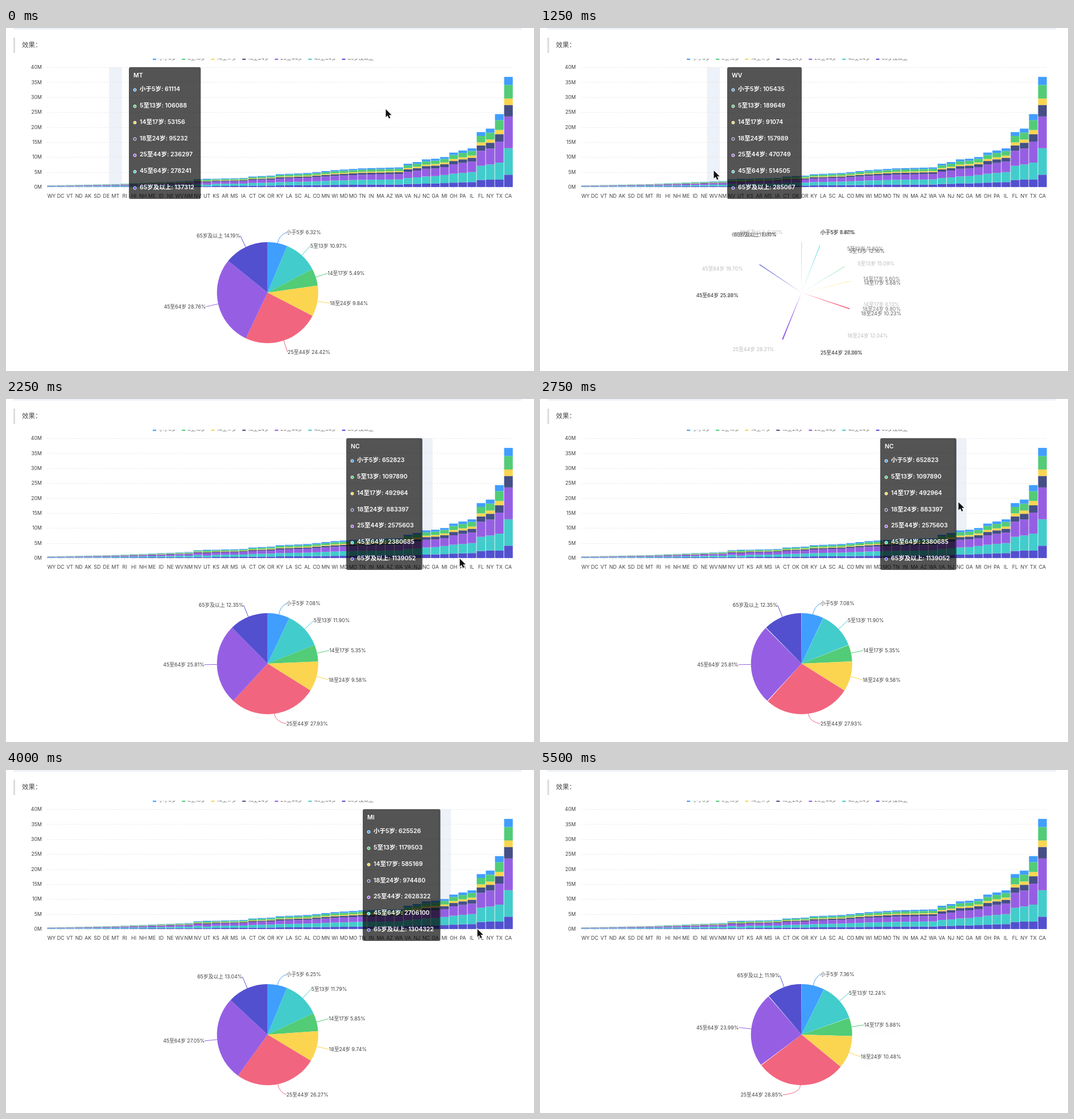
An HTML page with a canvas for the animation above (5750 ms loop, 928 by 604 pixels).

```html
<!DOCTYPE html>
<html lang="zh-CN">
<head>
<meta charset="utf-8">
<style>
  html, body { margin: 0; height: 100%; overflow: hidden; background: #fff; }
  canvas { display: block; }
</style>
</head>
<body>
<canvas id="stage" width="928" height="604"></canvas>
<script>
const ctx = document.getElementById('stage').getContext('2d');
const FAMILY = "Inter, 'Noto Sans CJK SC', 'Noto Sans CJK', sans-serif";
const INK = '#404040';
const [BLUE, GREEN, YELLOW, NAVY, PURPLE, TEAL, INDIGO, PINK] =
  ['#409eff', '#52cc76', '#fbd550', '#454f86', '#965fe3', '#42cccc', '#5250cf', '#f2657e'];
const barColors = [BLUE, GREEN, YELLOW, NAVY, PURPLE, TEAL, INDIGO];
const pieColors = [BLUE, TEAL, GREEN, YELLOW, PINK, PURPLE, INDIGO];
const groups = ['小于5岁', '5至13岁', '14至17岁', '18至24岁', '25至44岁', '45至64岁', '65岁及以上'];
const states = ('WY DC VT ND AK SD DE MT RI HI NH ME ID NE WV NM NV UT KS AR MS IA CT OK OR KY LA SC AL ' +
  'CO MN WI MD MO TN IN MA AZ WA VA NJ NC GA MI OH PA IL FL NY TX CA').split(' ');

const clamp = v => Math.max(0, Math.min(1, v));
const mix = (a, b, k) => a + (b - a) * k;
const sum = list => list.reduce((a, b) => a + b, 0);

// Linear path through points [position, ...values].
function along(points, at) {
  const next = points.findIndex(p => p[0] > at);
  if (next < 0) return points[points.length - 1].slice(1);
  const a = points[next - 1], b = points[next];
  return a.slice(1).map((v, i) => mix(v, b[i + 1], (at - a[0]) / (b[0] - a[0])));
}

// Counts that can be read on the stage; other states follow the curve with typical shares.
const rows = {
  MT: [61114, 106088, 53156, 95232, 236297, 278241, 137312],
  WV: [105435, 189649, 91074, 157989, 470749, 514505, 285067],
  NM: [148323, 241326, 112801, 203097, 517154, 501604, 260051],
  UT: [268916, 413034, 167685, 329585, 772024, 538978, 246202],
  NC: [652823, 1097890, 492964, 883397, 2575603, 2380685, 1139052],
  MI: [625526, 1179503, 585169, 974480, 2628322, 2706100, 1304322],
  TX: [2027307, 3277946, 1420518, 2454721, 7017731, 5666528, 2472223],
  CA: [2704659, 4499890, 2159981, 3853788, 10604510, 8819342, 4114496]
};
const shares = [.069, .118, .056, .098, .273, .258, .128];
const growth = [[0, .53], [7, .97], [15, 1.98], [16, 2.6], [21, 3], [22, 3.5], [24, 3.79], [25, 4.27],
  [28, 4.66], [31, 5.63], [34, 6.22], [38, 6.55], [39, 7.77], [43, 10], [44, 11.49], [46, 12.9],
  [47, 18.33], [48, 19.49]];
states.forEach((s, i) => {
  rows[s] ??= shares.map(k => Math.round(k * along(growth, i)[0] * 1e6));
});

const barX = s => 80 + states.indexOf(s) * 16.06;
const valueY = v => 280 - v * 5.275e-6;

// Pointer path [ms, x, y] and the states it touches [ms, state].
const pointer = [[0, 667, 143], [1250, 305, 251], [1500, 305, 251], [1750, 826, 281], [2250, 797, 281],
  [3000, 704, 132], [3250, 809, 282], [4000, 828, 280], [4250, 868, 150], [4750, 868, 150], [5000, 885, 232]];
const hovers = [[-1000, 'MT'], [510, 'SC'], [760, 'UT'], [843, 'NV'], [927, 'NM'], [1010, 'WV'],
  [1510, 'NC'], [2260, 'NC'], [3205, 'MI'], [4005, 'TX'], [5005, 'CA']];
const DELAY = 240, GROW = 400, FADE_IN = 100, FADE_OUT = 260;
const LEAVE = 5250, HIDE = 5500, LOOP = 5750;

function rect(x, y, w, h, color) {
  ctx.fillStyle = color;
  ctx.fillRect(x, y, w, h);
}
function text(str, x, y, { size = 8.8, color = INK, align = 'left', weight = 400 } = {}) {
  ctx.font = `${weight} ${size}px ${FAMILY}`;
  ctx.fillStyle = color;
  ctx.textAlign = align;
  ctx.textBaseline = 'middle';
  ctx.fillText(str, x, y);
  return ctx.measureText(str).width;
}

function drawPage() {
  rect(0, 0, 928, 604, '#fff');
  rect(13, 0, 893, 3, '#eef2f8');
  rect(13, 17, 3, 27, '#dcdcdc');
  text('效果：', 28, 30.5, { size: 11.5, color: '#444' });
}

function drawLegend() {
  ctx.save();
  ctx.beginPath();
  ctx.rect(250, 54, 420, 8);
  ctx.clip();
  let x = 258;
  groups.forEach((group, i) => {
    rect(x, 54, 6, 2, barColors[i]);
    x += 19.5 + text(group, x + 10, 53.5, { color: '#666' });
  });
  ctx.restore();
}

function drawBand(state, alpha) {
  rect(barX(state) - 11.3, 69, 22.6, 211, `rgba(204,214,236,${.35 * alpha})`);
}

function drawBars() {
  ctx.lineWidth = 1;
  ctx.strokeStyle = '#e6e6e6';
  ctx.setLineDash([2.5, 2.5]);
  for (let m = 0; m <= 40; m += 5) {
    const y = valueY(m * 1e6);
    ctx.beginPath();
    ctx.moveTo(72, Math.round(y) + .5);
    ctx.lineTo(891, Math.round(y) + .5);
    ctx.stroke();
    text(m + 'M', 63, y + .5, { align: 'right' });
  }
  ctx.setLineDash([]);
  for (const s of states) {
    const x = barX(s);
    let base = 0;
    for (let i = 6; i >= 0; i--) {
      const top = base + rows[s][i];
      rect(x - 7.5, valueY(top), 15.2, valueY(base) - valueY(top), barColors[i]);
      base = top;
    }
    rect(x - .5, 280.5, 1, 3, '#ddd');
    text(s, x, 296.5, { align: 'center' });
  }
}

const CX = 459.7, CY = 466, R = 89, LABEL_R = 111;
const polar = (angle, r) => [CX + r * Math.sin(angle), CY - r * Math.cos(angle)];

function eachSlice(state, draw) {
  const total = sum(rows[state]);
  let start = 0;
  rows[state].forEach((value, i) => {
    const share = value / total;
    draw(i, start, share * 2 * Math.PI, share);
    start += share * 2 * Math.PI;
  });
}

function drawPie(state, age) {
  const sweep = Math.max(.014, 1 - (1 - clamp(age / GROW)) ** 5);
  eachSlice(state, (i, start, size) => {
    const from = start - Math.PI / 2;
    ctx.beginPath();
    ctx.moveTo(CX, CY);
    ctx.arc(CX, CY, R, from, from + size * sweep);
    ctx.fillStyle = pieColors[i];
    ctx.fill();
  });
}

function drawLabels(state, alpha, withLines) {
  ctx.globalAlpha = alpha;
  eachSlice(state, (i, start, size, share) => {
    const mid = start + size / 2;
    const side = Math.sin(mid) < 0 ? -1 : 1;
    const dy = Math.max(-106, Math.min(106, -LABEL_R * Math.cos(mid)));
    const x = CX + side * Math.sqrt(LABEL_R ** 2 - dy ** 2), y = CY + dy;
    if (withLines) {
      ctx.beginPath();
      ctx.moveTo(...polar(mid, R));
      ctx.quadraticCurveTo(...polar(mid, R + 14), x, y);
      ctx.lineWidth = 1;
      ctx.strokeStyle = pieColors[i];
      ctx.stroke();
    }
    text(`${groups[i]} ${(share * 100).toFixed(2)}%`, x, y + .5, { align: side < 0 ? 'right' : 'left' });
  });
  ctx.globalAlpha = 1;
}

function tooltipBox(state) {
  const lines = groups.map((g, i) => `${g}: ${rows[state][i]}`);
  ctx.font = `600 10.5px ${FAMILY}`;
  const width = Math.max(...lines.map(s => ctx.measureText(s).width)) + 30.5;
  const x = barX(state);
  const left = x < 600 ? x + 24 : Math.min(x - 7, 850) - width;
  return { lines, width, left };
}

function drawTooltip(state, previous, progress) {
  const { lines, width, left: target } = tooltipBox(state);
  const left = Math.round(mix(tooltipBox(previous).left, target, progress));
  const white = { size: 10.5, color: '#fff', weight: 600 };
  ctx.beginPath();
  ctx.roundRect(left, 69, width, 232, 3);
  ctx.fillStyle = 'rgba(0,0,0,.67)';
  ctx.fill();
  text(state, left + 8, 84, white);
  lines.forEach((line, i) => {
    const y = 108 + i * 28.8;
    ctx.beginPath();
    ctx.arc(left + 10.5, y + 1, 2.5, 0, 7);
    ctx.fillStyle = barColors[i];
    ctx.fill();
    ctx.lineWidth = 1;
    ctx.strokeStyle = '#fff';
    ctx.stroke();
    text(line, left + 19, y, white);
  });
}

const arrow = new Path2D('M0 0V14L3.3 11L5.6 16.3L8 15.2L5.7 10.2H10.2Z');
function drawCursor([x, y]) {
  ctx.save();
  ctx.translate(x + .5, y);
  ctx.lineWidth = 1.6;
  ctx.strokeStyle = '#fff';
  ctx.stroke(arrow);
  ctx.fillStyle = '#111';
  ctx.fill(arrow);
  ctx.restore();
}

// Labels appear shortly after their pie starts and fade once the next pie replaces it.
function drawAllLabels(t, current) {
  hovers.forEach(([start, state], i) => {
    const next = hovers[i + 1]?.[0] ?? Infinity;
    const shown = clamp((t - start - DELAY) / FADE_IN);
    const gone = clamp((t - next - DELAY) / FADE_OUT);
    const alpha = shown * (1 - gone);
    if (alpha > 0) drawLabels(state, alpha, i === current);
  });
}

function frame() {
  // The picture is held for 750 ms, then renewed four times a second.
  const now = performance.now() % LOOP;
  const t = now < 750 ? 0 : Math.floor(now / 250) * 250;
  const lastBefore = time => hovers.findLastIndex(h => h[0] <= time);
  const active = lastBefore(t), charted = lastBefore(t - DELAY);
  const [start, state] = hovers[active];
  const previous = hovers[Math.max(0, active - 1)][1];
  const progress = clamp((t - start) / DELAY);

  drawPage();
  drawLegend();
  if (t < LEAVE) {
    drawBand(state, 1);
    drawBand(previous, .3 * (1 - progress));
  }
  drawBars();
  drawPie(hovers[charted][1], t - hovers[charted][0] - DELAY);
  drawAllLabels(t, charted);
  if (t < HIDE) drawTooltip(state, previous, progress);
  if (t < LEAVE) drawCursor(along(pointer, t));
  requestAnimationFrame(frame);
}
frame();
</script>
</body>
</html>
```
